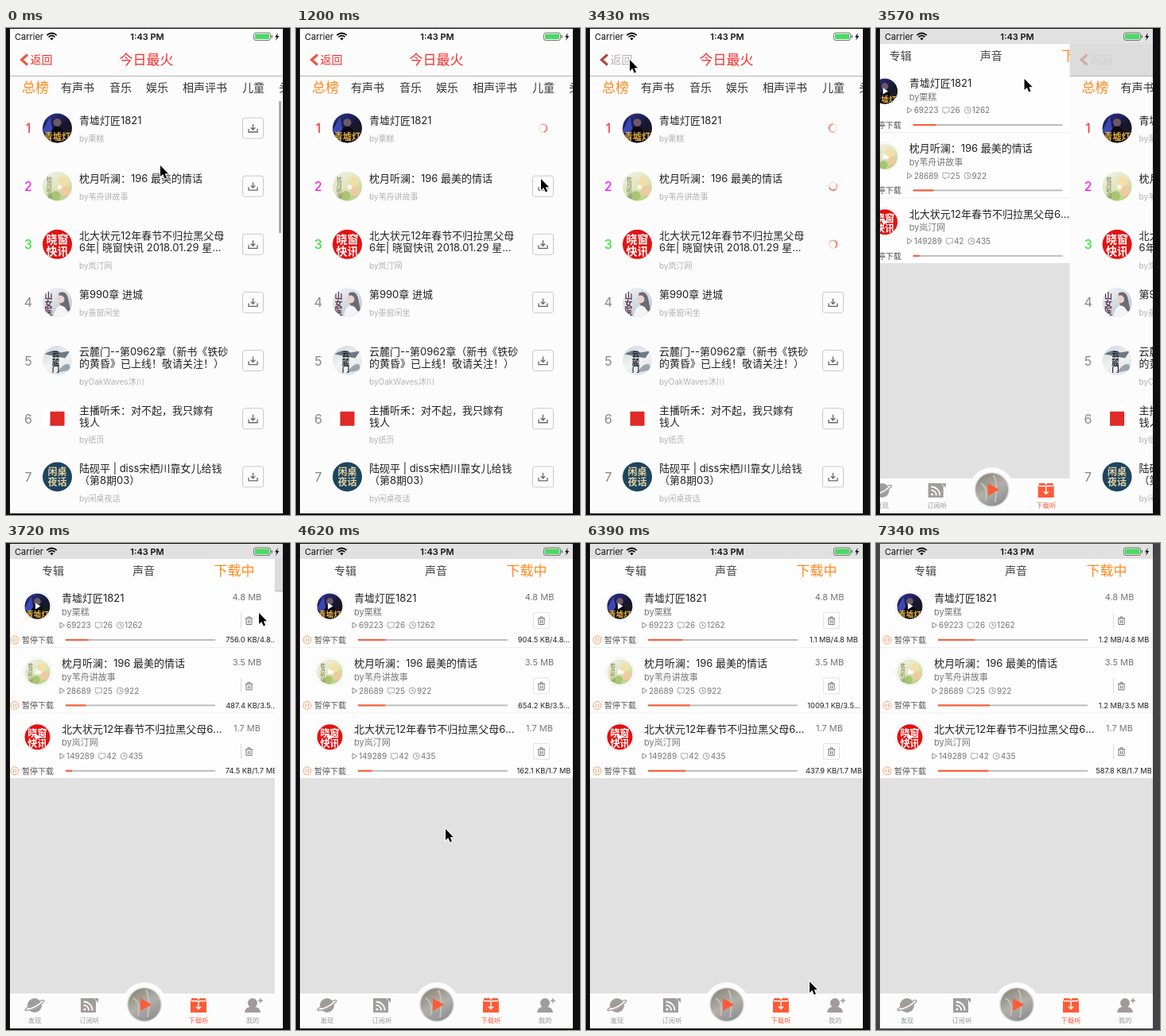
An HTML page with a canvas that plays this animation: 357x613 px, repeating every 7.44 s.

```html
<!DOCTYPE html>
<html lang="zh-CN">
<head>
<meta charset="utf-8">
<style>
html, body { margin: 0; width: 357px; height: 613px; overflow: hidden; background: #0c0c0e; }
canvas { display: block; }
</style>
</head>
<body>
<canvas id="stage" width="357" height="613"></canvas>
<script>
const g = document.getElementById('stage').getContext('2d');
const LOOP = 7440, STEP = 148.4;
const LEFT = 5, RIGHT = 348, WIDTH = RIGHT - LEFT;
const ORANGE = '#ff8a1e', RED = '#f5312d', CORAL = '#ff5a36';

const tracks = [
  { title: ['青墟灯匠1821'], by: '栗糕', size: '4.8', stats: ['69223', '26', '1262'] },
  { title: ['枕月听澜：196 最美的情话'], by: '苇舟讲故事', size: '3.5', stats: ['28689', '25', '922'] },
  { title: ['北大状元12年春节不归拉黑父母', '6年| 晓窗快讯 2018.01.29 星...'], by: '岚汀网', size: '1.7',
    stats: ['149289', '42', '435'], short: '北大状元12年春节不归拉黑父母6...' },
  { title: ['第990章 进城'], by: '墨窗闲坐' },
  { title: ['云麓门--第0962章（新书《铁砂', '的黄昏》已上线！敬请关注！）'], by: 'OakWaves沐川' },
  { title: ['主播听禾：对不起，我只尿有'.replace('尿', '嫁'), '钱人'], by: '纸页' },
  { title: ['陆砚平 | diss宋栖川靠女儿给钱', '（第8期03）'], by: '闲桌夜话' }
];
const startStep = [5, 10, 15];

// step, x, y of the pointer
const pointer = [
  [0, 194, 173], [1, 225, 160], [2, 270, 140], [3, 305, 130], [6, 305, 131], [7, 307, 155],
  [8, 308, 190], [10, 308, 198], [11, 308, 215], [12, 308, 244], [13, 308, 265], [15, 308, 267],
  [17, 270, 205], [19, 130, 70], [20, 75, 22], [21, 56, 38], [23, 55, 40], [25, 318, 88],
  [28, 270, 220], [31, 188, 360], [34, 196, 456], [37, 190, 450], [40, 225, 530],
  [41, 262, 596], [43, 281, 552], [45, 320, 585], [47, 350, 613]
];
// step, then kilobytes received per download
const received = [
  [25, 756, 487.4, 74.5], [31, 904.5, 654.2, 162.1], [43, 1126, 1009.1, 437.9], [49, 1203, 1240, 587.8]
];

function along(keys, n) {
  if (n <= keys[0][0]) return keys[0].slice(1);
  const j = keys.findIndex(k => k[0] >= n);
  if (j < 0) return keys[keys.length - 1].slice(1);
  const a = keys[j - 1], b = keys[j], u = (n - a[0]) / (b[0] - a[0]);
  return a.slice(1).map((v, i) => v + (b[i + 1] - v) * u);
}

function text(s, x, y, size, color, align = 'left', weight = 400) {
  g.font = `${weight} ${size}px Inter, "Noto Sans CJK SC", sans-serif`;
  g.textAlign = align;
  g.fillStyle = color;
  g.fillText(s, x, y + size * 0.37);
  return g.measureText(s).width;
}
function rect(x, y, w, h, color) {
  g.fillStyle = color;
  g.fillRect(x, y, w, h);
}
function disc(x, y, r, color) {
  g.fillStyle = color;
  g.beginPath();
  g.arc(x, y, r, 0, 7);
  g.fill();
}
function at(x, y, draw) {
  g.save();
  g.translate(x, y);
  draw();
  g.restore();
}
function fill(d, color) {
  g.fillStyle = color;
  g.fill(new Path2D(d));
}
function line(d, color, width = 1) {
  g.strokeStyle = color;
  g.lineWidth = width;
  g.stroke(new Path2D(d));
}
function box(x, y, w, h, r, color) {
  g.strokeStyle = color;
  g.lineWidth = 1;
  g.beginPath();
  g.roundRect(x, y, w, h, r);
  g.stroke();
}
function fade(...colors) {
  const f = g.createLinearGradient(-10, -18, 10, 18);
  colors.forEach((c, i) => f.addColorStop(i / (colors.length - 1), c));
  return f;
}
function column(s, x, y, size, color, weight) {
  [...s].forEach((ch, i) => text(ch, x, y + i * size, size, color, 'center', weight));
}

const covers = [
  () => {
    disc(0, 0, 19, fade('#2a2f86', '#15172b', '#1d1a24'));
    fill('M-19 4L-9-14-4 12z', '#3b48b4');
    fill('M-11 19Q-10-1 0-2 10-1 11 19z', '#090a14');
    disc(0, -7, 5, '#6d5868');
    text('青墟灯', 0, 11, 11, '#e9b23c', 'center', 700);
  },
  () => {
    disc(0, 0, 19, fade('#f0efe2', '#dfe5bd', '#b9cf83'));
    disc(7, -6, 6, '#f3dfa6');
    disc(10, 6, 6, '#f1c9a0');
    disc(-2, 12, 6, '#a8c573');
    disc(3, 1, 3, '#fff6e6');
    column('枕月听澜', -10, -9, 7, '#71794f', 500);
  },
  () => {
    disc(0, 0, 19, '#e31212');
    text('晓窗', 0, -6, 14, '#fff', 'center', 700);
    text('快讯', 0, 9, 14, '#fff', 'center', 700);
  },
  () => {
    disc(0, 0, 19, fade('#eef0f3', '#d5dce4', '#b9bfca'));
    fill('M2-12Q12-16 14-3L17 12 7 8Q0 0 2-12z', '#6e6a74');
    disc(4, -4, 5, '#e8d3cc');
    fill('M-5 19Q-2 3 5 4 13 5 14 19z', '#f4f4f8');
    column('山女医', -11, -8, 10, '#5c3b4e', 600);
  },
  () => {
    disc(0, 0, 19, fade('#d4dbe1', '#f1f2f3', '#dfe3e6'));
    fill('M-16-8Q-4-16 4-10L16-12 10-3-2-5z', '#6f7984');
    fill('M0 15Q8 2 15 5L17 12z', '#9aa5ae');
    column('云麓门', -2, -8, 9.5, '#23272e', 700);
  },
  () => {
    disc(0, 0, 19, '#fff');
    rect(-9, -9, 18, 18, '#e02a26');
  },
  () => {
    disc(0, 0, 19, '#1d4560');
    text('闲桌', 0, -6, 12, '#e3cf9c', 'center', 700);
    text('夜话', 0, 7, 12, '#e3cf9c', 'center', 700);
  }
];
function cover(i, x, y, r) {
  at(x, y, () => {
    g.beginPath();
    g.arc(0, 0, r, 0, 7);
    g.clip();
    g.scale(r / 18.5, r / 18.5);
    covers[i]();
  });
}

function statusBar(color) {
  rect(LEFT, 0, WIDTH, 20, color);
  text('Carrier', 11, 11, 11, '#111');
  text('1:43 PM', 177.5, 11, 11, '#111', 'center', 600);
  at(57.5, 15.5, () => {
    fill('M0 0L-2.2-2.4Q0-4 2.2-2.4z', '#000');
    line('M-4-4.2Q0-7.4 4-4.2M-6.2-6.4Q0-11.6 6.2-6.4', '#000', 1.7);
  });
  box(311.5, 6, 21, 9.5, 2.5, '#777');
  rect(313, 7.5, 18, 6.5, '#4cd964');
  rect(333.5, 9, 1.5, 3.5, '#777');
  fill('M342 6L338 11.5H340.3L339 16 343.3 10H340.8z', '#111');
}

function navBar(pressed) {
  line('M27 33.5L19.5 40 27 46.5', pressed ? '#a8483b' : '#f4503f', 3);
  text('返回', 30.5, 40, 14, pressed ? '#b9b4b4' : RED);
  text('今日最火', 176.5, 40, 17, RED, 'center');
}

function spinner(y, n) {
  const turn = n * 1.9;
  g.lineWidth = 1.2;
  [['#ffd3c9', 0, 6.3], ['#ff9a86', 1.5, 5], ['#f8654c', 3, 5]].forEach(([c, a, b]) => {
    g.strokeStyle = c;
    g.beginPath();
    g.arc(310.5, y, 5, turn + a, turn + b);
    g.stroke();
  });
}
function downloadButton(y) {
  box(297.5, y - 13, 26, 26, 3, '#c9c9c9');
  at(310.5, y, () => line('M-5.5 1V5H5.5V1M0-5V2M-2.8-.8L0 2 2.8-.8', '#666', 1.3));
}

function listPage(n) {
  rect(LEFT, 60, WIDTH, 553, '#fcfcfc');
  rect(LEFT, 60, WIDTH, 1, '#b4b4b4');
  text('总榜', 20, 75, 17, ORANGE);
  [['有声书', 69], ['音乐', 130], ['娱乐', 176], ['相声评书', 222], ['儿童', 297], ['头条', 343]]
    .forEach(([s, x]) => text(s, x, 75, 14, '#333'));
  tracks.forEach((track, i) => {
    const y = 126 + i * 73.15, two = track.title.length > 1;
    text(i + 1, 28, y, 16, ['#f22', '#f0f', '#1de61d'][i] || '#888', 'center');
    cover(i, 64.5, y, 18.5);
    track.title.forEach((s, k) => text(s, 92, y - (two ? 11 : 10) + k * 15, 13, '#222'));
    text('by' + track.by, 92, y + (two ? 27 : 13), 10, '#b2b2b2');
    if (n >= startStep[i]) spinner(y, n - i);
    else downloadButton(y);
  });
  const bar = Math.max(0, Math.min(1, (7 - n) / 3));
  g.globalAlpha = bar;
  rect(343, 92, 3, 166, '#aaa');
  g.globalAlpha = 1;
}

function statRow(stats, y) {
  const icons = [
    () => line('M.5-3.5V3.5L6 0z', '#888'),
    () => line('M.5-3.5H8.5V2.5H5L3 4.5V2.5H.5z', '#999', 0.8),
    () => line('M.5 0A4 4 0 1 0 8.5 0A4 4 0 1 0 .5 0M4.5-2.5V.5H7', '#888', 0.8)
  ];
  let x = 70.5;
  stats.forEach((s, i) => {
    at(x, y, icons[i]);
    x += i ? 10 : 8.5;
    x += text(s, x, y, 10, '#777') + 5;
  });
}

function downloadRow(i, kb, framed) {
  const track = tracks[i], y = 69 + i * 82.4;
  const total = track.size * 1024;
  const amount = kb < 1024 ? kb.toFixed(1) + ' KB' : (kb / 1024).toFixed(1) + ' MB';
  const clipped = kb < 1024 && i < 2;

  disc(42.5, y + 10.5, 18, '#e4e4e4');
  disc(42.5, y + 10.5, 17.5, '#fff');
  cover(i, 42.5, y + 10.5, 16);
  at(42.5, y + 10.5, () => fill('M-2.5-4L4 0-2.5 4z', '#fff'));
  text(track.short || track.title[0], 73, y, 13, '#222');
  text('by' + track.by, 73, y + 17.5, 11, '#777');
  statRow(track.stats, y + 34.5);
  text(track.size + ' MB', 306, y - 1, 11, '#777', 'center');
  if (framed) box(298.5, y + 18.5, 20, 20, 1.5, '#e2e2e2');
  else rect(298, y + 19, 1, 19, '#d8d8d8');
  at(308.5, y + 29, () => line('M-4.5-3H4.5M-1.5-3V-5H1.5V-3M-3.5-3V4.5H3.5V-3M-1-1V3M1-1V3', '#666', 0.9));

  at(14, y + 53, () => line('M-5 0A5 5 0 1 0 5 0A5 5 0 1 0-5 0M-1.5-2.5V2.5M1.5-2.5V2.5', '#f59a62', 0.9));
  text('暂停下载', 23, y + 53, 10, '#555');
  rect(78, y + 52, 188, 2, '#bdbdbd');
  rect(78, y + 52, 188 * kb / total, 2, CORAL);
  text(`${amount}/${track.size}${clipped ? '...' : ' MB'}`, 311.5, y + 53, 9.3, '#222', 'center');
  if (i < 2) rect(LEFT, y + 62, WIDTH, 1, '#efefef');
}

function tabBar() {
  disc(177, 581, 28, '#fcfcfc');
  rect(LEFT, 567, WIDTH, 46, '#fcfcfc');
  const gray = '#a09c9c';
  at(39, 582, () => {
    disc(0, 0, 9, gray);
    line('M-12 5Q-2 7 12-6', '#fcfcfc', 3);
    line('M-8 2Q-14 6-11 6.500Q0 6 11-4Q14-8 7-6', gray, 1.3);
  });
  at(108, 582, () => {
    fill('M-11-9H5L8-6V9H-11zM6-9H11V-3z', gray);
    disc(-6, 5, 1.6, '#fcfcfc');
    line('M-7.500 0A6 6 0 0 1-1 6.500M-7.500-4.500A10.500 10.500 0 0 1 3.500 6.500', '#fcfcfc', 1.8);
  });
  at(177, 581, () => {
    disc(0, 0, 22, '#dedede');
    disc(0, 0, 20.5, fade('#8f8b80', '#b3b0a8', '#8e9095'));
    line('M-14-8Q-4-2-8 14M2-18Q8-8 4 16', '#c3c1bb', 2);
    fill('M-5-8L9 0-5 8z', CORAL);
  });
  at(245, 582, () => {
    fill('M-9-9H-2L0-7 2-9H9V-6H10V9H-10V-6H-9z', CORAL);
    line('M-9-5.500H-1L0-4 1-5.500H9M0-3V4M-3 1.500L0 4.500 3 1.500', '#fff', 1.4);
  });
  at(313, 582, () => {
    disc(0, -3, 6, gray);
    fill('M-10 9Q-9 2-3 2H3Q9 2 10 9z', gray);
    line('M7-6H13M10-9V-3', gray, 1.5);
  });
  [['发现', 39], ['订阅听', 108], ['下载听', 245], ['我的', 313]].forEach(([s, x], i) =>
    text(s, x, 600.5, 8.3, i === 2 ? CORAL : '#999', 'center'));
}

function downloadsPage(n) {
  rect(LEFT, 20, WIDTH, 593, '#e1e1e1');
  rect(LEFT, 20, WIDTH, 276, '#fdfdfd');
  text('专辑', 62, 34.5, 14, '#444', 'center');
  text('声音', 176, 34.5, 14, '#444', 'center');
  text('下载中', 290, 34.5, 17, ORANGE, 'center');
  const kb = along(received, n);
  for (let i = 0; i < 3; i++) downloadRow(i, kb[i], n > 25 && n < 49);
  tabBar();
}

function drawPointer(n) {
  const [x, y] = along(pointer, n);
  at(x, y, () => {
    const arrow = 'M0 0V14L3.300 11 5.700 16.500 8 15.500 5.700 10.200H10z';
    line(arrow, '#fff', 2);
    fill(arrow, '#000');
  });
}

function draw(t) {
  const n = t >= 7335 ? 49 : Math.min(48, Math.floor(t / STEP));
  const u = Math.max(0, Math.min(1, (n - 23.1) / 2.75));
  const slide = 1 - (1 - u) ** 3;

  rect(0, 0, 357, 613, n < 49 ? '#0e0e10' : '#434345');
  g.save();
  g.beginPath();
  g.rect(LEFT, 1, WIDTH, 610);
  g.clip();
  if (slide > 0) at(-0.3 * WIDTH * (1 - slide), 0, () => downloadsPage(n));
  if (slide < 1) at(WIDTH * slide, 0, () => {
    rect(LEFT, 20, WIDTH, 41, slide ? '#dcdcdc' : '#fcfcfc');
    g.globalAlpha = 1 - slide;
    navBar(n >= 22);
    g.globalAlpha = 1;
    listPage(n);
  });
  statusBar(slide ? '#e1e1e1' : '#fcfcfc');
  g.restore();
  if (n < 48) drawPointer(n);
}

const begin = performance.now();
function tick() {
  draw((performance.now() - begin) % LOOP);
  requestAnimationFrame(tick);
}
tick();
</script>
</body>
</html>
```
